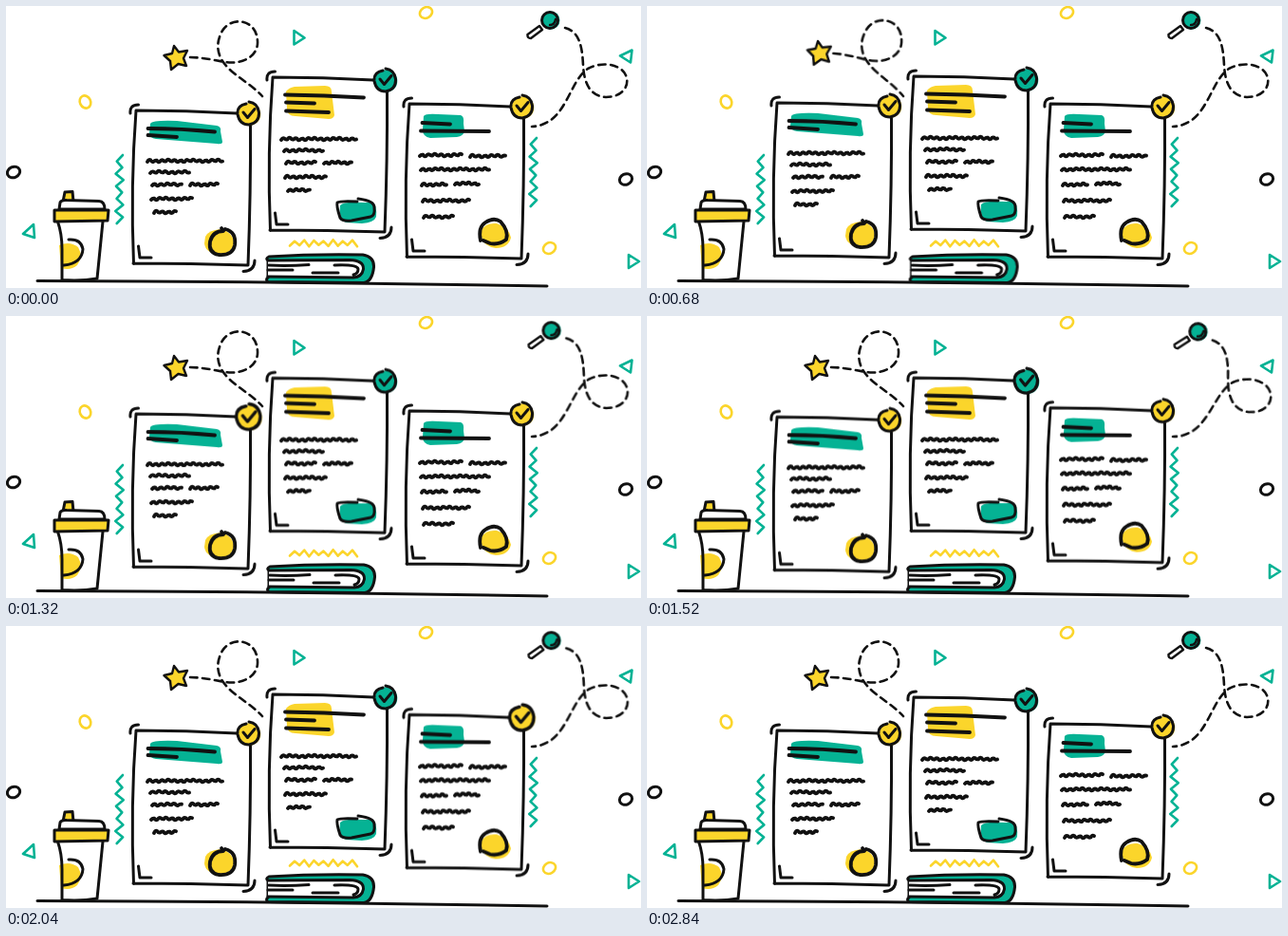
Write an HTML page that moves like this. It is 669x297 px and loops after 2.88 s.

```html
<!DOCTYPE html>
<html lang="en">
<head>
<meta charset="utf-8">
<title>Approved documents</title>
<style>
html, body { margin: 0; width: 100%; height: 100%; overflow: hidden; background: #fff; }
svg { display: block; width: 669px; height: 297px; }
.ink { fill: none; stroke: #111; stroke-width: 3; stroke-linecap: round; stroke-linejoin: round; }
.bold { stroke-width: 3.8; }
.thin { stroke-width: 2.4; }
.dash { stroke-width: 2.6; stroke-dasharray: 7.5 5.5; }
.white { fill: #fff; }
.y { fill: #fbd52b; }
.g { fill: #05b294; }
.ys, .gs { fill: none; stroke-width: 2.6; stroke-linecap: round; stroke-linejoin: round; }
.ys { stroke: #fbd52b; }
.gs { stroke: #05b294; }
</style>
</head>
<body>
<svg id="stage" viewBox="0 0 669 297">
  <g id="marks"></g>
  <path class="ink" d="M33 289.5Q300 290 570 295"/>

  <g id="star">
    <path class="ink dash" d="M194 54C206 54 219 57 231 59C252 62 266 51 265 37C264 14 238 10 228 26C219 42 223 56 238 69C250 79 261 85 270 95"/>
    <path class="ink thin y" d="M177 42L182 48.500L191 47L187 55L190 63L181.500 61L174 67L173 58L166.500 52L175 50Z"/>
  </g>

  <g id="lens">
    <path class="ink dash" d="M589 23C604 27 607 42 608 62C609 84 617 95 632 96C648 96 656 86 654 76C651 62 630 57 613 66C592 80 591 125 554 127"/>
    <path class="ink thin white" d="M562 21L549.500 30Q549 34 553 34L565 25Z"/>
    <circle class="g" cx="574" cy="15" r="9.500"/>
    <circle class="ink" cx="573" cy="15" r="8.500"/>
    <path class="ink thin" d="M579 14Q578 20 573 20"/>
  </g>

  <g id="cup">
    <path class="ink y" d="M60 206L62 196L70 195.500L71 206Z"/>
    <path class="ink white" d="M56 214L57 207Q58 204 64 204.500L98 205.500Q104 206 104 214Z"/>
    <path class="white" d="M55 227L60 288L95 288L102 227Z"/>
    <path class="y" d="M56 252Q67 247 76 254Q82 264 75 273Q68 279 58 276Z"/>
    <path class="ink" d="M54.500 227Q59 240 59 256L59 288.500Q79 290 96 287L102 227M66 246Q79 245 81 256Q80 271 61 273"/>
    <path class="ink y" d="M51 215L108 215L107 226L51 227Z"/>
  </g>

  <g id="book">
    <path class="ink g" d="M277 264Q325 261 376 262Q388 264 387.500 275Q386 290 377 291.500L276 290.500Q273 288 276 286L276 268Q273 266 277 264Z"/>
    <path class="white" d="M276 269L368 268Q377 271 376 278Q374 286 365 286L276 285Z"/>
    <path class="ink" d="M276 268L362 267.500Q377 268 376.500 277Q375 285.500 366 286L276 285M277 273Q296 274 319 272.500M276 278L302 278M323 281L350 281M346 273Q370 272 371 277Q371 282 366 283"/>
  </g>
</svg>
<script>
const LOOP = 2880;
const EASE = 'cubic-bezier(.37,0,.63,1)';
const stage = document.getElementById('stage');

function add(parent, tag, attrs) {
  const el = document.createElementNS(stage.namespaceURI, tag);
  for (const key in attrs) el.setAttribute(key, attrs[key]);
  return parent.appendChild(el);
}
const path = (parent, cls, d) => add(parent, 'path', { class: cls, d });

// Moves out to a pose and back again inside the loop.
function swing(el, start, span, pose, origin) {
  const rest = 'none';
  const at = ms => ms / LOOP;
  if (origin) el.style.transformOrigin = origin;
  el.animate([
    { offset: 0, transform: rest },
    { offset: at(start), transform: rest, easing: EASE },
    { offset: at(start + span / 2), transform: pose, easing: EASE },
    { offset: at(start + span), transform: rest },
    { offset: 1, transform: rest }
  ], { duration: LOOP, iterations: Infinity });
}

// Handwritten wiggle along a row.
function scribble(x0, x1, y) {
  const n = Math.max(4, Math.round((x1 - x0) / 3.3));
  let d = `M${x0} ${y + 1}`;
  for (let i = 1; i <= n; i++) {
    const x = x0 + (x1 - x0) * i / n;
    const up = (i % 2 ? -1 : 1) * (1.5 + .8 * Math.sin(i * 2.3 + x0));
    d += `Q${x - 2} ${y + up} ${x} ${y + up * .4}`;
  }
  return d;
}

// Wavy ribbon, vertical or horizontal.
function ribbon(x, y, length, count, wide, vertical) {
  let d = '';
  for (let i = 0; i <= count; i++) {
    const along = length * i / count;
    const side = (i % 2 ? 0 : wide) + .8 * Math.sin(i * 1.9);
    d += (i ? 'L' : 'M') + (vertical ? `${x + side} ${y + along}` : `${x + along} ${y + side}`);
  }
  return d;
}

const rows = [[149, 228, 163], [152, 193, 175], [154, 185, 188], [194, 223, 188], [153, 196, 203], [156, 179, 217]];
const stamp = {
  patch: 'M210 243Q213 236 226 235Q239 238 240 249Q239 260 225 262Q210 260 209 250Z',
  ring: 'M227 234L229 237Q218 237 215 248Q213 260 224 262Q239 263 241 252Q243 238 231 235'
};
const docs = [
  {
    dx: 0, dy: 0, start: 0, tone: 'y', rows, stamp, stampTone: 'y',
    patch: ['g', 'M152 124Q154 120 180 121L222 126Q227 127 226 132L228 143Q228 146 222 145L158 140Q151 139 151 134Z'],
    lines: 'M149.500 129Q185 129 220 132.500M149.500 136L180 138'
  },
  {
    dx: 144, dy: -35, start: 480, tone: 'g', stampTone: 'g',
    rows: rows.map(([a, b, y]) => [a + 141, b + 141, y - 23]),
    patch: ['y', 'M295 90Q298 86 304 85L336 84Q343 84 343 90L346 115Q345 119 340 119L305 116Q296 116 296 108Z'],
    lines: 'M294 93.500Q335 94 377 96.500M295 101.500L325 102.500M295 110.500L340 112',
    stamp: {
      patch: 'M352 210Q356 206 372 207L386 207Q391 210 390 222Q388 228 375 229L358 228Q350 224 352 210Z',
      ring: 'M370 206Q352 205 349 207Q348 211 352 223Q354 227 364 226L384 222Q389 221 388 212Q388 205 371 203'
    }
  },
  {
    dx: 288, dy: -7, start: 960, tone: 'y', stampTone: 'y',
    rows: [[436, 480, 157], [489, 526, 158], [437, 509, 172], [438, 464, 188], [473, 498, 187], [439, 488, 205], [440, 471, 222]],
    patch: ['g', 'M440 116Q442 113 455 114L479 115Q483 116 482 124L483 132Q482 137 475 138L447 139Q439 138 439 130Z'],
    lines: 'M438.500 123L468 124.500M437 131.500L509 132',
    stamp: {
      patch: 'M501 236Q505 228 517 229Q530 233 532 244Q529 255 516 255Q503 253 501 243Z',
      ring: 'M500 247Q497 233 505 228Q514 222 521 227Q530 237 527 246Q519 252 510 250L503 247'
    }
  }
];

function drawDoc(doc) {
  const all = add(stage, 'g', {});
  const frame = add(all, 'g', { transform: `translate(${doc.dx} ${doc.dy})` });
  path(frame, 'white', 'M137 110L257 114L255 273L134 271Z');
  path(frame, 'ink', 'M243 113Q190 110 137 110Q131 190 134.500 271.500M134 271Q195 271 255 273Q258 195 257.500 126');
  path(frame, 'ink', 'M131 113Q130 104 139.500 104M262 268Q262 279 250 279.500M139.500 253L141 265L153 265');
  path(all, doc.patch[0], doc.patch[1]);
  path(all, 'ink bold', doc.lines);
  path(all, 'ink bold', doc.rows.map(row => scribble(...row)).join(''));
  path(all, doc.stampTone, doc.stamp.patch);
  path(all, doc.dx === 144 ? 'ink' : 'ink bold', doc.stamp.ring);

  const badge = add(frame, 'g', {});
  add(badge, 'circle', { class: doc.tone, cx: 256.5, cy: 114, r: 11.8 });
  path(badge, 'ink', 'M253 103Q243 105 244 114Q246 125 256 125Q267 123 266.500 112Q265 102 256 101');
  path(badge, 'ink', 'M250 112L254.500 117.500L262 108.500');

  swing(all, doc.start, 1920, 'translateY(-10px)');
  swing(badge, doc.start + 920, 560, 'scale(1.2)', '255px 113px');
}

const marks = document.getElementById('marks');
const loops = [[83.500, 101, 'ys', 65], [442.500, 7, 'ys', -30], [572.500, 255, 'ys', -30], [8, 175, 'ink', -25], [653, 182.500, 'ink', -25]];
for (const [x, y, cls, turn] of loops) {
  add(marks, 'ellipse', { class: cls, cx: x, cy: y, rx: 6.8, ry: 5.6, transform: `rotate(${turn} ${x} ${y})` });
}
path(marks, 'gs', 'M303.500 26L314.500 33.500L303.500 40.500ZM647 52.500L659.500 46.500L658 59.500ZM29 230L18 240L30 244ZM656 262L667 269L656 276Z');
path(marks, 'gs', ribbon(116, 157, 72, 11, 7, true));
path(marks, 'gs', ribbon(552, 139, 72, 11, 7, true));
path(marks, 'ys', ribbon(299, 247, 71, 14, 5.500, false));

docs.forEach(drawDoc);

const part = id => document.getElementById(id);
swing(part('cup'), 0, 480, 'rotate(-5.800deg)', '62px 289px');
swing(part('star'), 0, 960, 'rotate(5deg)', '270px 95px');
swing(part('book'), 480, 960, 'translateX(7px)');
swing(part('lens'), 1200, 960, 'rotate(5deg)', '554px 127px');
</script>
</body>
</html>
```
